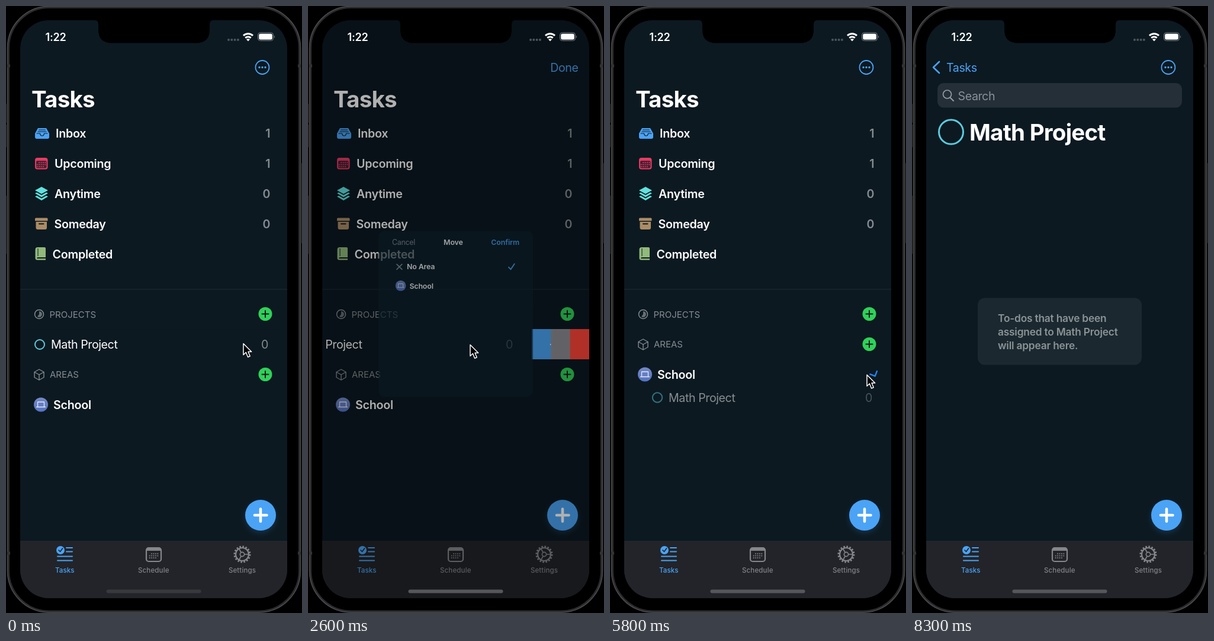
An HTML page for the animation above (8830 ms loop, 500 by 1024 pixels).

```html
<!DOCTYPE html>
<html lang="en">
<head>
<meta charset="utf-8">
<title>Tasks</title>
<style>
  html, body { margin: 0; width: 100%; height: 100%; overflow: hidden; background: #000; }
  svg { display: block; width: 500px; height: 1024px; }
  text { font: 400 19.65px Inter, sans-serif; letter-spacing: -.022em; fill: #fff; }
  .semi { font-weight: 600; letter-spacing: -.012em; }
  .title { font-size: 38.5px; font-weight: 700; letter-spacing: -.02em; }
  .count { fill: #858c91; font-weight: 600; text-anchor: end; }
  .head { font-size: 15px; letter-spacing: 0; fill: #858c91; }
  .tab { font-size: 11.56px; font-weight: 500; letter-spacing: .01em; text-anchor: middle; fill: #828387; }
  .note { font-size: 17.34px; font-weight: 600; letter-spacing: -.012em; fill: #8a9397; }
  .mid { text-anchor: middle; }
  text.blue { fill: #4ba3f5; }
  text.gray { fill: #858c91; }
  .line { fill: none; stroke-linecap: round; stroke-linejoin: round; }
</style>
</head>
<body>
<svg viewBox="0 0 500 1024">
  <defs>
    <clipPath id="screen"><rect x="24" y="24" width="451" height="975" rx="48"/></clipPath>
    <clipPath id="body"><rect x="24" y="24" width="451" height="879"/></clipPath>
    <linearGradient id="badgeFill" x2="0" y2="1">
      <stop stop-color="#7389c4"/><stop offset="1" stop-color="#5573c4"/>
    </linearGradient>
    <filter id="soft" x="-50%" y="-50%" width="200%" height="200%"><feGaussianBlur stdDeviation="5"/></filter>
    <g id="add">
      <circle r="11.5" fill="#30d158"/>
      <path d="M-5.5 0H5.5M0-5.5V5.5" class="line" stroke="#0c1921" stroke-width="2"/>
    </g>
    <g id="badge">
      <circle r="12" fill="url(#badgeFill)"/>
      <path d="M-5.5 3V-4.5H5.5V3M-7.5 4H7.5" class="line" stroke="#e4e9f6" stroke-width="1.3"/>
    </g>
    <g id="dots" fill="none" stroke-linecap="round" stroke-dasharray="0 3.4" stroke-width="2">
      <path d="M-3.4-3.6H7M-6.8 0H7M-6.8 3.6H4"/>
    </g>
  </defs>

  <!-- phone body -->
  <rect width="500" height="1024" fill="#000"/>
  <path d="M.5 165V197M.5 200V238M.5 320V418M499.5 265V400" stroke="#2c2c2e"/>
  <rect x="4" y="2" width="492" height="1019.5" rx="69" fill="#000" stroke="#2b2b2d" stroke-width="4"/>
  <rect x="2.5" y=".5" width="495" height="1022.5" rx="70.5" fill="none" stroke="#4b4b4d" stroke-width="1.5"/>
  <path d="M2 101H7M493 101H498M2 923H7M493 923H498" stroke="#333335" stroke-width="5"/>

  <g clip-path="url(#screen)">
    <rect x="24" y="24" width="451" height="975" fill="#0c1921"/>

    <g clip-path="url(#body)">
      <g id="home">
        <text x="43" y="171" class="title">Tasks</text>

        <path d="M54 206H68L73 215V221Q73 224 70 224H52Q49 224 49 221V215Z" fill="#4ba3f5"/>
        <path d="M52 215H57.5Q58 219 61 219T64.5 215H70M55.5 209H66.500M54 212H68" class="line" stroke="#0c1921" stroke-width="1.2"/>
        <rect x="49" y="256" width="21.500" height="19.500" rx="4" fill="#ea3a62"/>
        <rect x="51" y="261" width="17.500" height="12.500" rx="2" fill="#0c1921" opacity=".75"/>
        <use href="#dots" x="59.500" y="267.500" stroke="#ea3a62"/>
        <path d="M60 305L71 311L60 317L49 311Z M49 316L52 314.500L60 319L68 314.500L71 316L60 322.500Z M49 321.500L52 320L60 324.500L68 320L71 321.500L60 328Z" fill="#63e0dd"/>
        <path d="M50.500 357.500H69Q70.500 357.500 70.500 359V362.500H49V359Q49 357.500 50.500 357.500ZM50.500 364H69V374Q69 377 66 377H53.500Q50.500 377 50.500 374Z" fill="#ac8c66"/>
        <path d="M56 367.500H63.500" class="line" stroke="#0c1921" stroke-width="2"/>
        <path d="M53.500 407H65Q67 407 67 409V424H54Q52 424 52 426H67V428.500H53Q49.500 428.500 49.500 425V411Q49.500 407 53.500 407Z" fill="#91ba7b"/>
        <path d="M54 409V422" stroke="#0c1921" stroke-width="1"/>

        <text x="84" y="222" class="semi">Inbox</text><text x="446" y="222" class="count">1</text>
        <text x="82" y="273" class="semi">Upcoming</text><text x="446" y="273" class="count">1</text>
        <text x="82" y="324" class="semi">Anytime</text><text x="446" y="324" class="count">0</text>
        <text x="81.500" y="375" class="semi">Someday</text><text x="446" y="375" class="count">0</text>
        <text x="78.500" y="425.500" class="semi">Completed</text>
        <path d="M24 478H475" stroke="#212d34"/>

        <circle cx="56" cy="520" r="7.500" fill="none" stroke="#858c91" stroke-width="1.500"/>
        <path d="M56 515A5 5 0 1 1 53 524L56 520Z" fill="#858c91" opacity=".75"/>
        <text x="73.500" y="525.500" class="head">PROJECTS</text>
        <use href="#add" x="438" y="519.500"/>

        <g id="project">
          <g id="actions">
            <rect id="move" y="545" height="51" width="260" fill="#4ba3f5"/>
            <path id="moveIcon" d="M32 571H53M45 563L53 571L45 579" class="line" stroke="#fff" stroke-width="2.500"/>
            <rect id="edit" y="545" height="51" width="260" fill="#8e8e93"/>
            <path id="editIcon" d="M34 581L36 574L49 561L54 566L41 579Z" class="line" stroke="#fff" stroke-width="2.300"/>
            <rect id="trash" y="545" height="51" width="260" fill="#ff453a"/>
            <path id="trashIcon" d="M34 564H52M39 564V560H47V564M36 564L37 582H49L50 564M43 568V578" class="line" stroke="#fff" stroke-width="2.200"/>
          </g>
          <g id="swipeRow">
            <rect id="swipeFill" x="24" y="545.500" width="451" height="50.500" rx="12"/>
            <circle id="swipeRing" cx="57" cy="571" r="8" fill="none" stroke-width="2"/>
            <text x="76" y="578">Math Project</text>
            <text id="swipeCount" x="437" y="578" class="mid gray">0</text>
          </g>
        </g>

        <g id="areas">
          <path d="M56 613L64 617.500V626.500L56 631L48 626.500V617.500ZM48 617.500L56 622L64 617.500M56 622V631" class="line" stroke="#858c91" stroke-width="1.400"/>
          <text x="74" y="627" class="head">AREAS</text>
          <use href="#add" x="438" y="621.500"/>
          <use href="#badge" x="59" y="672.500"/>
          <text x="80" y="680" class="semi">School</text>
          <path id="chevron" d="M-3.200-6.200L3.200 0L-3.200 6.200" class="line" stroke="#1f86f5" stroke-width="2.400"/>
        </g>

        <g id="nested">
          <rect id="nestedFill" x="24" y="647.500" width="451" height="50" rx="12" fill="#5bcbde"/>
          <circle id="nestedRing" cx="80" cy="673" r="8.200" fill="none" stroke-width="2"/>
          <text x="99" y="680">Math Project</text>
          <text id="nestedCount" x="437" y="680" class="mid gray">0</text>
        </g>
      </g>

      <g id="detail">
        <rect x="24" y="24" width="451" height="880" fill="#0c1921"/>
        <path d="M46 94L36 103.500L46 113" class="line" stroke="#4ba3f5" stroke-width="2.600"/>
        <text x="58" y="110.500" class="blue">Tasks</text>
        <rect x="43" y="130" width="413" height="41.500" rx="10" fill="#242f38"/>
        <path d="M65 155L70 160" class="line" stroke="#979da2" stroke-width="2"/>
        <circle cx="59.500" cy="149" r="7" fill="none" stroke="#979da2" stroke-width="1.700"/>
        <text x="77.500" y="158.500" style="fill:#8a9197">Search</text>
        <circle cx="66" cy="212.500" r="20.500" fill="none" stroke="#5bcbde" stroke-width="3"/>
        <text x="97" y="227" class="title">Math Project</text>
        <rect x="111" y="492.500" width="277" height="113" rx="12" fill="#1b282f"/>
        <text class="note"><tspan x="145" y="532.500">To-dos that have been</tspan><tspan x="145" y="555.500">assigned to Math Project</tspan><tspan x="145" y="578.500">will appear here.</tspan></text>
      </g>

      <g id="more">
        <circle cx="433" cy="103.500" r="11.500" fill="none" stroke="#4ba3f5" stroke-width="1.800"/>
        <path d="M428 103.500H428.010M433 103.500H433.010M438 103.500H438.010" class="line" stroke="#4ba3f5" stroke-width="3.400"/>
      </g>
      <text id="done" x="456.500" y="110.500" class="blue" text-anchor="end">Done</text>
      <circle cx="430" cy="863" r="26" fill="#4ba3f5" opacity=".18" filter="url(#soft)"/>
      <circle cx="430" cy="859" r="26" fill="#4ba3f5"/>
      <path d="M420 859H440.500M430 848.500V869.500" class="line" stroke="#fff" stroke-width="4.600"/>
    </g>

    <!-- tab bar -->
    <rect x="24" y="903" width="451" height="96" fill="#222429"/>
    <path d="M24 903H475" stroke="#292c31"/>
    <circle cx="92" cy="918" r="7" fill="#4ba3f5"/>
    <path d="M89 918L91.500 920.500L95.500 915" class="line" stroke="#222429" stroke-width="1.700"/>
    <path d="M102 914H112M102 920.500H112M87 928.500H112M87 935.500H112" class="line" stroke="#4ba3f5" stroke-width="2"/>
    <text x="99.300" y="955.500" class="tab blue">Tasks</text>
    <rect x="237" y="914" width="25" height="23" rx="4" fill="none" stroke="#85868a" stroke-width="2.200"/>
    <path d="M237 917H262" stroke="#85868a" stroke-width="4"/>
    <use href="#dots" x="249.500" y="927.500" stroke="#85868a"/>
    <text x="249.300" y="955.500" class="tab">Schedule</text>
    <g transform="translate(399 925)" fill="none" stroke="#85868a">
      <circle r="13" stroke-width="3" stroke-dasharray="2.600 2.505"/>
      <circle r="11" stroke-width="2.200"/>
      <circle r="3.600" stroke-width="1.600"/>
      <path d="M3.600 0H11M-1.800-3.100L-5.500-9.500M-1.800 3.100L-5.500 9.500" stroke-width="1.700"/>
    </g>
    <text x="399" y="955.500" class="tab">Settings</text>

    <rect id="dim" x="24" y="24" width="451" height="975"/>

    <g id="dialog">
      <rect x="43" y="298.500" width="413" height="442" rx="16" fill="#0b1a23"/>
      <text x="79.500" y="336" class="gray">Cancel</text>
      <text x="243" y="336" class="semi mid">Move</text>
      <text x="419.500" y="336" class="semi blue" text-anchor="end">Confirm</text>
      <path d="M92 387L106 401M106 387L92 401" class="line" stroke="#8b9196" stroke-width="2.600"/>
      <text x="119" y="401" class="semi">No Area</text>
      <use href="#badge" transform="translate(102.500 444.500) scale(1.170)"/>
      <text x="126" y="452" class="semi">School</text>
      <path id="check" d="M391 446L396.500 452L406.500 437" class="line" stroke="#4ba3f5" stroke-width="3"/>
    </g>

    <!-- notch, status bar, home indicator -->
    <path d="M150 23V24Q156 24 156 31V40Q156 62.500 179 62.500H321Q344 62.500 344 40V31Q344 24 350 24V23Z" fill="#000"/>
    <text x="66.500" y="58.500" class="semi" style="font-size:18px">1:22</text>
    <path d="M376 57H393" class="line" stroke="#4b555b" stroke-width="4" stroke-dasharray="0 5.300"/>
    <g class="line" stroke="#fff" stroke-width="3" style="stroke-linecap:butt">
      <path d="M401 50A11.500 11.500 0 0 1 417 50M404.300 53.800A6.800 6.800 0 0 1 413.700 53.800"/>
    </g>
    <path d="M409 59.500L406 56.300Q409 54 412 56.300Z" fill="#fff"/>
    <rect x="425.500" y="45" width="26" height="13.500" rx="4" fill="none" stroke="#7d858a"/>
    <rect x="427.200" y="46.700" width="22.600" height="10" rx="2.600" fill="#fff"/>
    <path d="M453 49.500Q455 52 453 54.500Z" fill="#7d858a"/>
    <rect id="indicator" x="169.500" y="984.500" width="160" height="6" rx="3"/>
  </g>

  <circle id="touch" r="23" fill="#c9cccd" fill-opacity=".86" stroke="#9aa9ad"/>
  <path id="cursor" d="M0 .5V19.500L4.400 15.300L7.600 23.200L11.200 21.700L8 14.200H13.700Z" fill="#000" stroke="#fff" stroke-width="1.500" stroke-linejoin="round"/>
</svg>

<script>
const LOOP = 8830, STEP = 100, CYAN = '#5bcbde', GRAY = '#858c91';
const $ = id => document.getElementById(id);
const set = (id, attrs) => { for (const k in attrs) $(id).setAttribute(k, attrs[k]); };
const show = (id, alpha) => set(id, { opacity: +alpha });
const shift = (id, x, y = 0) => set(id, { transform: `translate(${x} ${y})` });
const between = (t, a, b) => t >= a && t < b;

// Eased value between [time, value] keys.
function track(t, keys) {
  let i = 0;
  while (i < keys.length - 1 && keys[i + 1][0] <= t) i++;
  const [t0, v0] = keys[i], [t1, v1] = keys[i + 1] || keys[i];
  if (t <= t0 || t1 === t0) return v0;
  const p = (t - t0) / (t1 - t0);
  return v0 + (v1 - v0) * p * p * (3 - 2 * p);
}

const path = [
  [0, 401, 569], [700, 398, 569], [900, 372, 571], [1300, 262, 572], [1600, 150, 572],
  [1700, 150, 572], [2200, 274, 571], [2800, 274, 571], [3300, 190, 443], [3500, 190, 443],
  [4000, 361, 331], [4300, 361, 331], [4900, 446, 570], [5300, 446, 619], [5700, 446, 619],
  [6400, 230, 669]
];
const pathX = path.map(k => [k[0], k[1]]), pathY = path.map(k => [k[0], k[2]]);

function pressable(prefix, pressed) {
  set(prefix + 'Ring', { stroke: pressed ? '#fff' : CYAN });
  $(prefix + 'Count').style.fill = pressed ? '#a9e3ec' : GRAY;
}

function draw(t) {
  const x = track(t, pathX), y = track(t, pathY);
  shift('cursor', x, y);
  show('cursor', t < 7300);
  shift('touch', x + 25, y + 1);
  show('touch', between(t, 1000, 1700));

  // swipe actions on the project row
  const swipe = track(t, [[800, 0], [1300, 84], [1600, 240], [1700, 252], [2300, 252], [2600, 97], [2800, 0]]);
  const dragging = between(t, 1000, 1700);
  shift('swipeRow', -swipe);
  set('swipeFill', { fill: dragging ? CYAN : '#0c1921' });
  pressable('swipe', dragging);
  show('actions', swipe > 0);
  ['move', 'edit', 'trash'].forEach((id, i) => {
    const left = 475 - swipe * (3 - i) / 3;
    set(id, { x: left });
    shift(id + 'Icon', left);
  });
  const editing = between(t, 900, 2700);
  show('done', editing);
  show('more', !editing);

  // move dialog
  const open = track(t, [[2400, 0], [2600, .4], [2900, 1], [4300, 1], [4600, 0]]);
  const scale = .387 + .613 * open, fade = Math.min(1, open * 1.55);
  set('dialog', { transform: `translate(249.5 519) scale(${scale}) translate(-249.5 -519)`, opacity: fade });
  show('dim', .5 * fade);
  shift('check', 0, t < 3500 ? -51 : 0);

  // project moves into its area
  const moved = track(t, [[4300, 0], [4600, 1]]);
  show('project', 1 - moved);
  shift('areas', 0, -51 * moved);
  const turn = track(t, [[5600, 0], [5900, 90]]);
  set('chevron', { transform: `translate(446.5 672.5) rotate(${turn})`, opacity: moved });
  const unfold = track(t, [[5600, 0], [6000, 1]]);
  show('nested', unfold);
  shift('nested', 0, -25 * (1 - unfold));
  show('nestedFill', t >= 6500);
  pressable('nested', t >= 6500);

  // push to the project page
  const push = track(t, [[6700, 0], [7200, 1]]);
  shift('home', -140 * push);
  shift('detail', 451 * (1 - push));
  show('detail', push > 0);

  set('indicator', { fill: t < 1500 ? '#38393c' : '#56575a' });
}

function frame(now) {
  const t = now % LOOP;
  draw(Math.min(8300, Math.floor(t / STEP) * STEP));
  requestAnimationFrame(frame);
}
draw(0);
requestAnimationFrame(frame);
</script>
</body>
</html>
```
